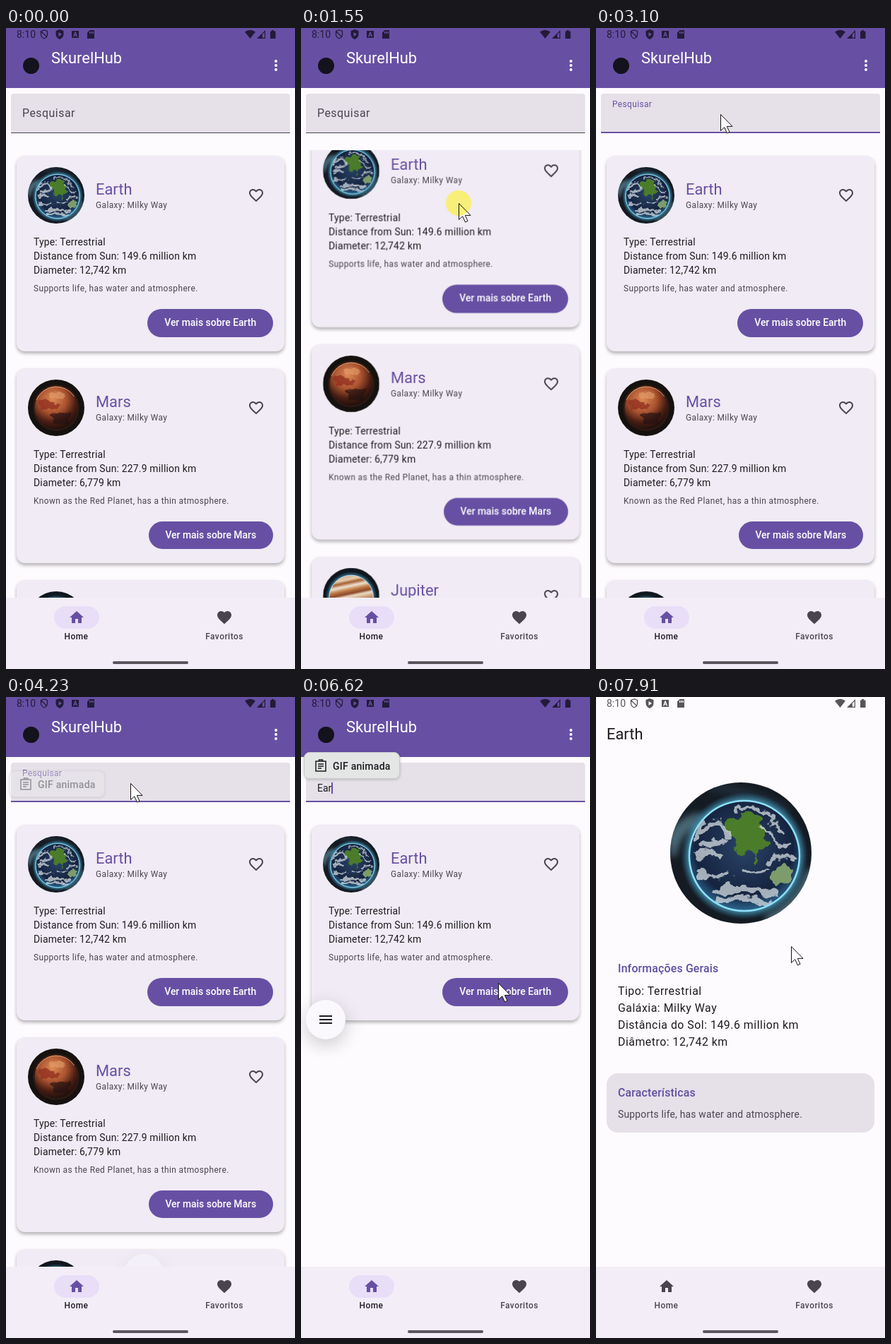
Write an HTML page that moves like this. It is 409 px wide and 908 px high and loops after 8 s.

```html
<!DOCTYPE html>
<html lang="pt">
<head>
<meta charset="utf-8">
<title>Planetas</title>
<style>
  html, body { margin: 0; width: 100%; height: 100%; overflow: hidden; background: #fefbff; }
  * { box-sizing: border-box; }
  /* --dp: the stage is 411.43 dp wide */
  #stage {
    position: relative; width: 409px; height: 908px; overflow: hidden;
    background: #fefbff; color: #1d1b20; font-family: Roboto, sans-serif;
    --dp: .9941px; --purple: #6750a4; --grey: #49454f;
  }
  #stage div, #stage article, #stage p, #stage svg, #stage h1, #stage h2 { position: absolute; margin: 0; }
  p, h1, h2 { white-space: pre; }
  h1 { font-size: calc(22 * var(--dp)); font-weight: 400; line-height: 28px; }
  h2 { font-size: calc(16 * var(--dp)); font-weight: 500; line-height: 24px; letter-spacing: .15px; color: #5f4fa0; left: 31px; }
  svg { fill: currentColor; overflow: visible; }
  .icon { width: 24px; height: 24px; }
  .planet { border-radius: 50%; overflow: hidden; }

  /* One loop is 8 s, so 1% is 80 ms. Values hold unless a keyframe sets its own steps. */
  .a { animation: 8s step-end -8ms infinite; }

  #bar { width: 409px; height: 85px; background: var(--purple); color: #fff; }
  #logo { left: 23.5px; top: 42px; width: 23px; height: 23px; border-radius: 50%; background: #14121c; }
  #field { left: 7px; top: 93px; width: 395px; height: 56px; border-radius: 4px 4px 0 0; background: #e6e0e9; }
  #label { left: 16px; top: 16px; font-size: calc(16 * var(--dp)); line-height: 24px; letter-spacing: .5px; transform-origin: 0 50%; animation-name: label; }
  #line { left: 0; bottom: 0; width: 100%; animation-name: line; }
  #input { left: 16px; top: 28px; height: 16px; display: flex; font-size: calc(14 * var(--dp)); line-height: 16px; }
  #typed { overflow: hidden; animation-name: type; }
  #caret { width: 2px; height: 16px; background: var(--purple); animation-name: blink; }

  #view { top: 173px; width: 409px; height: 634px; overflow: hidden; }
  #list { width: 409px; height: 634px; transform-origin: 0 0; animation-name: scroll; }
  article {
    left: 15px; width: 379px; height: 276.5px; border-radius: 12px;
    background: #f0ebf4; box-shadow: 0 3px 5px rgba(0, 0, 0, .3);
  }
  .other { animation-name: filter; }
  article .planet { left: 16px; top: 16px; width: 80px; height: 80px; }
  article h1 { left: 112px; top: 34px; color: var(--purple); }
  .small { font-size: calc(12 * var(--dp)); line-height: 16px; letter-spacing: .4px; color: var(--grey); }
  .facts { left: 24px; top: 112px; font-size: calc(14 * var(--dp)); line-height: 20px; letter-spacing: .2px; }
  .more {
    right: 16px; top: 217px; height: 39.8px; padding: 0 calc(24 * var(--dp)); border-radius: 20px; white-space: nowrap;
    background: var(--purple); color: #fff; font-size: calc(14 * var(--dp)); font-weight: 500; line-height: 39.8px;
  }

  #chip {
    left: 4px; top: 104px; width: 136px; height: 38px; border-radius: 8px; border: 1px solid #c9cacd;
    background: #e4e5e5; box-shadow: 0 1px 4px rgba(0, 0, 0, .2); animation-name: chip;
  }
  #chip p { left: 40px; top: 9px; font-size: 14px; font-weight: 500; line-height: 20px; letter-spacing: .25px; }
  #chip svg { left: 14px; top: 9px; width: 18px; height: 18px; fill: none; stroke: currentColor; stroke-width: 1.5; }
  #bubble {
    left: -28px; top: -28px; width: 56px; height: 56px; border-radius: 50%; background: #faf8fd;
    box-shadow: 0 8px 26px rgba(0, 0, 0, .2); animation-name: bubble;
  }

  #detail { width: 409px; height: 807px; background: #fefbff; animation-name: appear; }
  #facts { left: 31px; top: 405px; font-size: calc(16 * var(--dp)); line-height: 24px; letter-spacing: .5px; }
  #traits { left: 15px; top: 533px; width: 379px; height: 84px; border-radius: 16px; background: #e6e0e9; }
  #note { left: 31px; top: 581px; font-size: calc(14 * var(--dp)); line-height: 20px; letter-spacing: .2px; color: var(--grey); }
  #nav { top: 807px; width: 409px; height: 101px; background: #f3edf7; color: var(--grey); }
  #nav p { width: 120px; top: 47px; text-align: center; font-size: calc(12 * var(--dp)); font-weight: 500; line-height: 16px; letter-spacing: .5px; }
  #pill { left: 67.5px; top: 12px; width: 64px; height: 32px; border-radius: 16px; background: #e8def8; animation-name: vanish; }
  #home { animation-name: house; }
  #homeText { animation-name: homeText; }
  #handle { left: 151px; top: 90px; width: 107px; height: 4px; border-radius: 2px; background: #59565e; }
  #status { color: rgba(0, 0, 0, .66); }

  #pointer { left: 0; top: 0; animation-name: point; }
  #press {
    left: -18px; top: -18px; width: 36px; height: 36px; border-radius: 50%;
    background: rgba(250, 240, 90, .8); mix-blend-mode: multiply; animation-name: press;
  }

  @keyframes label {
    0% { color: #49454f; transform: translateY(0) scale(1); }
    32.125% { color: #5a4b86; transform: translateY(-4px) scale(.92); animation-timing-function: steps(2); }
    33.75%, 100% { color: #6750a4; transform: translateY(-12.5px) scale(.75); }
  }
  @keyframes line {
    0% { height: 1px; background: #49454f; }
    32.125%, 100% { height: 2px; background: #6750a4; }
  }
  @keyframes type {
    0% { max-width: 0; }
    61.75% { max-width: 8px; }
    62.625% { max-width: 15.6px; }
    63.5%, 100% { max-width: 40px; }
  }
  @keyframes blink {
    0%, 38.75%, 51.25%, 69.375% { opacity: 0; }
    33.75%, 45.375%, 61.75%, 76%, 100% { opacity: 1; }
  }
  @keyframes scroll {
    0% { transform: translateY(0) scaleY(1); }
    11.75% { transform: translateY(0) scaleY(1); animation-timing-function: steps(4); }
    15.125% { transform: translateY(-40px) scaleY(1); animation-timing-function: steps(3); }
    17.6625% { transform: translateY(-70px) scaleY(1); animation-timing-function: steps(4); }
    21% { transform: translateY(0) scaleY(1.006); }
    22% { transform: translateY(0) scaleY(1.005); animation-timing-function: steps(3); }
    24.5% { transform: translateY(0) scaleY(1.002); }
    32.125%, 100% { transform: translateY(0) scaleY(1); }
  }
  @keyframes filter {
    0% { visibility: visible; }
    62.625%, 100% { visibility: hidden; }
  }
  @keyframes chip {
    0% { opacity: 0; translate: 0 0; }
    51.25% { opacity: .2; translate: 0 0; animation-timing-function: steps(4); }
    54.75% { opacity: 1; translate: 0 0; }
    61.75% { opacity: 1; translate: 0 -6px; animation-timing-function: steps(3); }
    64.375%, 100% { opacity: 1; translate: 0 -26px; }
  }
  @keyframes bubble {
    0% { opacity: 0; translate: 205px 839px; }
    51.25% { opacity: .2; translate: 205px 839px; animation-timing-function: steps(4); }
    54.75% { opacity: 1; translate: 165px 750px; animation-timing-function: steps(7); }
    60.875% { opacity: 1; translate: 45px 483px; }
    61.75% { opacity: 1; translate: 43px 477px; animation-timing-function: steps(3); }
    64.375%, 100% { opacity: 1; translate: 35px 457px; }
  }
  @keyframes appear {
    0% { opacity: 0; }
    85.25% { opacity: .15; animation-timing-function: steps(5); }
    89.375%, 100% { opacity: 1; }
  }
  @keyframes vanish {
    0% { opacity: 1; }
    85.25% { opacity: .85; animation-timing-function: steps(5); }
    89.375%, 100% { opacity: 0; }
  }
  @keyframes house {
    0% { color: #6750a4; }
    85.25% { color: #6750a4; animation-timing-function: steps(5); }
    89.375%, 100% { color: #49454f; }
  }
  @keyframes homeText {
    0% { color: #1d1b20; }
    85.25% { color: #1d1b20; animation-timing-function: steps(5); }
    89.375%, 100% { color: #49454f; }
  }
  @keyframes press {
    0%, 22%, 33.75%, 82.75%, 100% { opacity: 0; }
    11.75%, 30.375%, 80.375% { opacity: 1; }
  }
  @keyframes point {
    0% { translate: 430px 863px; }
    .875% { translate: 353px 863px; animation-timing-function: steps(7); }
    7.2375% { translate: 150px 219px; animation-timing-function: steps(4); }
    10.875% { translate: 226px 278px; }
    11.75% { translate: 226px 282px; animation-timing-function: steps(4); }
    15.125% { translate: 224px 241px; animation-timing-function: steps(3); }
    17.6625% { translate: 224px 211px; animation-timing-function: steps(4); }
    21% { translate: 222px 285px; }
    22% { translate: 214px 262px; animation-timing-function: steps(3); }
    24.5% { translate: 180px 150px; }
    25.25% { translate: 179px 139px; animation-timing-function: steps(4); }
    29.25% { translate: 176px 121px; }
    31.25% { translate: 176px 122px; }
    72.75% { translate: 186px 150px; animation-timing-function: steps(5); }
    76.875% { translate: 279px 405px; }
    92.75% { translate: 276px 385px; animation-timing-function: steps(4); }
    96.25% { translate: 249px 259px; }
    98% { translate: 262px 300px; }
    98.875%, 100% { translate: 276px 353px; }
  }
</style>
</head>
<body>
<svg width="0" height="0" style="position:absolute">
  <defs>
    <radialGradient id="glow"><stop offset=".84" stop-color="#6fd4f5"/><stop offset="1" stop-color="#2a8fc0" stop-opacity="0"/></radialGradient>
    <radialGradient id="sea" cx=".5" cy=".42" r=".6"><stop offset="0" stop-color="#2b4468"/><stop offset=".75" stop-color="#15233f"/><stop offset="1" stop-color="#2f6f98"/></radialGradient>
    <radialGradient id="rust" cx=".42" cy=".3" r=".72"><stop offset="0" stop-color="#dc8a56"/><stop offset=".45" stop-color="#a8522f"/><stop offset=".75" stop-color="#4a1e13"/><stop offset="1" stop-color="#1c0f0c"/></radialGradient>
    <linearGradient id="bands" gradientTransform="rotate(78)">
      <stop offset="0" stop-color="#b98a66"/><stop offset=".18" stop-color="#e8cfae"/><stop offset=".25" stop-color="#a55f34"/>
      <stop offset=".33" stop-color="#efe3d0"/><stop offset=".42" stop-color="#c07a45"/><stop offset=".5" stop-color="#8a4a2a"/>
      <stop offset=".56" stop-color="#ecdcc4"/><stop offset=".7" stop-color="#b8774a"/><stop offset="1" stop-color="#4a2c20"/>
    </linearGradient>
    <clipPath id="globe"><circle cx="52.5" cy="52" r="38.5"/></clipPath>
    <filter id="soft"><feGaussianBlur stdDeviation="2.5"/></filter>
    <filter id="rough">
      <feTurbulence type="fractalNoise" baseFrequency=".11" numOctaves="3" seed="4"/>
      <feDisplacementMap in="SourceGraphic" scale="11" xChannelSelector="R" yChannelSelector="G"/>
      <feGaussianBlur stdDeviation=".3"/>
    </filter>
  </defs>
  <symbol id="Earth" viewBox="0 0 100 100">
    <rect width="100" height="100" fill="#151b23"/>
    <g fill="none" stroke="#6a9cab" stroke-linecap="round" filter="url(#soft)">
      <path d="M0 42Q4 28 20 24M2 50Q6 34 17 30" stroke-width="5" opacity=".6"/>
      <path d="M70 96Q88 88 99 64" stroke-width="6" opacity=".6"/>
      <path d="M30 4Q60 6 82 20" stroke="#2c4553" stroke-width="5" opacity=".5"/>
    </g>
    <circle cx="52.5" cy="52" r="45" fill="url(#glow)" opacity=".8"/>
    <circle cx="52.5" cy="52" r="38.5" fill="url(#sea)"/>
    <g clip-path="url(#globe)">
      <g filter="url(#rough)">
        <path d="M42 27L52 21 63 24 68 34 64 40 71 43 63 48 60 57 55 49 48 51 45 44 42 37z" fill="#4c7c2c"/>
        <path d="M72 62L82 57 88 60 84 69 76 76 73 70z" fill="#7c9c6c"/>
      </g>
      <g fill="none" stroke="#d5dce2" stroke-linecap="round" opacity=".75" filter="url(#rough)">
        <path d="M20 38Q27 26 36 29T40 40M20 52Q30 46 36 52M24 45L36 42" stroke-width="4"/>
        <path d="M46 20Q56 14 66 22T80 36M66 32Q74 38 82 46" stroke-width="2"/>
        <path d="M20 62Q30 70 42 66M50 62Q60 66 68 62M70 56Q78 50 88 54" stroke-width="2.500"/>
        <path d="M30 78Q52 72 76 80M34 84Q52 80 70 86" stroke-width="4"/>
      </g>
    </g>
    <circle cx="52.5" cy="52" r="39" fill="none" stroke="#8fe0fa" stroke-width="1.2"/>
  </symbol>
  <symbol id="Mars" viewBox="0 0 100 100">
    <rect width="100" height="100" fill="#15110f"/>
    <circle cx="50" cy="50" r="41" fill="#2e1a14"/>
    <circle cx="50" cy="50" r="38" fill="url(#rust)"/>
    <g filter="url(#rough)">
      <path d="M20 38Q32 32 40 40T54 40L60 46 48 52 36 50 24 54z" fill="#94301f" opacity=".8"/>
      <path d="M40 64Q56 54 78 58L70 78 50 80z" fill="#24110d" opacity=".7"/>
      <path d="M36 24Q52 18 68 28L62 36 44 32z" fill="#e6a06c" opacity=".6"/>
    </g>
    <path d="M15 36A38 38 0 0 1 82 30" fill="none" stroke="#e0a070" stroke-width="1.2"/>
  </symbol>
  <symbol id="Jupiter" viewBox="0 0 100 100">
    <rect width="100" height="100" fill="#10161d"/>
    <circle cx="50" cy="52" r="46" fill="url(#glow)" opacity=".55"/>
    <circle cx="50" cy="52" r="39" fill="url(#bands)"/>
    <ellipse cx="64" cy="62" rx="8" ry="4.5" fill="#a8492b"/>
    <circle cx="50" cy="52" r="39" fill="none" stroke="#d6efff" stroke-width="1.2"/>
  </symbol>
  <symbol id="heart" viewBox="0 0 24 24"><path d="M12 21.35l-1.45-1.32C5.4 15.36 2 12.28 2 8.5 2 5.42 4.42 3 7.5 3c1.74 0 3.41.81 4.5 2.09C13.09 3.81 14.76 3 16.5 3 19.58 3 22 5.42 22 8.5c0 3.78-3.4 6.86-8.55 11.54z"/></symbol>
</svg>

<div id="stage">
  <div id="bar">
    <div id="logo"></div>
    <h1 style="left:64px;top:29px">SkurelHub</h1>
    <svg class="icon" style="left:370px;top:41px" viewBox="0 0 24 24"><circle cx="12" cy="6" r="2"/><circle cx="12" cy="12" r="2"/><circle cx="12" cy="18" r="2"/></svg>
  </div>
  <div id="field">
    <p id="label" class="a">Pesquisar</p>
    <div id="input"><span id="typed" class="a">Ear</span><span id="caret" class="a"></span></div>
    <div id="line" class="a"></div>
  </div>
  <div id="view"><div id="list" class="a"></div></div>

  <div id="chip" class="a">
    <svg viewBox="0 0 18 18"><path d="M2 3H16V17H2zM5 7H13M5 10H13M5 13H10M6.500 3V1H11.500V3"/></svg>
    <p>GIF animada</p>
  </div>
  <div id="bubble" class="a">
    <svg style="left:19px;top:21px;width:18px;height:14px" viewBox="0 0 18 14"><path d="M0 1h18v2H0zM0 6h18v2H0zM0 11h18v2H0z"/></svg>
  </div>

  <div id="detail" class="a">
    <h1 style="left:15px;top:39px">Earth</h1>
    <svg class="planet" style="left:105px;top:121px;width:200px;height:200px"><use href="#Earth"/></svg>
    <h2 style="top:373px">Informações Gerais</h2>
    <p id="facts">Tipo: Terrestrial
Galáxia: Milky Way
Distância do Sol: 149.6 million km
Diâmetro: 12,742 km</p>
    <div id="traits"></div>
    <h2 style="top:549px">Características</h2>
    <p id="note">Supports life, has water and atmosphere.</p>
  </div>

  <div id="nav">
    <div id="pill" class="a"></div>
    <svg id="home" class="icon a" style="left:87.5px;top:16px" viewBox="0 0 24 24"><path d="M10 20v-6h4v6h5v-8h3L12 3 2 12h3v8z"/></svg>
    <p id="homeText" class="a" style="left:39.5px">Home</p>
    <svg class="icon" style="left:297px;top:16px"><use href="#heart"/></svg>
    <p style="left:249px">Favoritos</p>
    <div id="handle"></div>
  </div>

  <div id="status">
    <p style="left:15px;top:1px;font-size:14px;line-height:16px">8:10</p>
    <svg width="409" height="18" viewBox="0 0 409 18" style="left:0;top:0">
      <path d="M49.5 4.5L54 3l4.500 1.500V9q0 4-4.500 6-4.500-2-4.500-6zM50 5l8 8" fill="none" stroke="currentColor" stroke-width="1.3"/>
      <path d="M70.500 4L76 2l5.500 2v5q0 4.500-5.500 7-5.500-2.500-5.500-7zM74.500 6v6l4.500-3z" fill-rule="evenodd"/>
      <path d="M93 4h10v10H93zM95 12.500h1.400l.6-1.700h2.200l.6 1.700h1.400L98.700 5.500h-1.300zM97.400 9.600l.7-2 .7 2z" fill-rule="evenodd"/>
      <path d="M118.500 3H125v12H115V6.500zM118 5v3h1.300V5zM120.300 5v3h1.300V5zM122.600 5v3h1.300V5z" fill-rule="evenodd"/>
      <path d="M338 5.500Q345.500 0 353 5.500L345.500 15z"/>
      <path d="M367 3v12h-12zM365.800 6v7.800h-3V9z" fill-rule="evenodd"/>
      <path d="M374 4.500h2V3h3v1.500h2.500V15H374z"/>
    </svg>
  </div>

  <div id="pointer" class="a">
    <svg width="18" height="28" style="left:0;top:0" viewBox="0 0 18 28">
      <path d="M.5.5V23.500L5.700 18.700 9.500 27 13 25.400 9.300 17.400H17z" fill="#fff" stroke="#111" stroke-linejoin="round"/>
    </svg>
    <div id="press" class="a"></div>
  </div>
</div>

<script>
  const planets = [
    ['Earth', 'Terrestrial', '149.6', '12,742', 'Supports life, has water and atmosphere.'],
    ['Mars', 'Terrestrial', '227.9', '6,779', 'Known as the Red Planet, has a thin atmosphere.'],
    ['Jupiter', 'Gas Giant', '778.5', '139,820', 'Largest planet, has a great red storm.']
  ];
  const card = ([name, type, sun, size, note], i) => `
    <article class="${i ? 'other a' : ''}" style="top:${8 + i * 300.5}px">
      <svg class="planet"><use href="#${name}"/></svg>
      <h1>${name}</h1>
      <p class="small" style="left:112px;top:62px">Galaxy: Milky Way</p>
      <svg class="icon" style="left:327px;top:44px;color:var(--grey)" viewBox="0 0 24 24">
        <path d="M16.5 3c-1.74 0-3.41.81-4.5 2.09C10.91 3.81 9.24 3 7.5 3 4.42 3 2 5.42 2 8.5c0 3.78 3.4 6.86 8.55 11.54L12 21.35l1.45-1.32C18.6 15.36 22 12.28 22 8.5 22 5.42 19.58 3 16.5 3zM12 18.65C7.14 14.24 4 11.39 4 8.5 4 6.5 5.5 5 7.5 5c1.54 0 3.04.99 3.57 2.36h1.87C13.46 5.99 14.96 5 16.5 5c2 0 3.5 1.5 3.5 3.5 0 2.89-3.14 5.74-8 10.15z" fill-rule="evenodd"/>
      </svg>
      <p class="facts">Type: ${type}\nDistance from Sun: ${sun} million km\nDiameter: ${size} km</p>
      <p class="small" style="left:24px;top:180px">${note}</p>
      <div class="more">Ver mais sobre ${name}</div>
    </article>`;
  document.getElementById('list').innerHTML = planets.map(card).join('');
</script>
</body>
</html>
```
